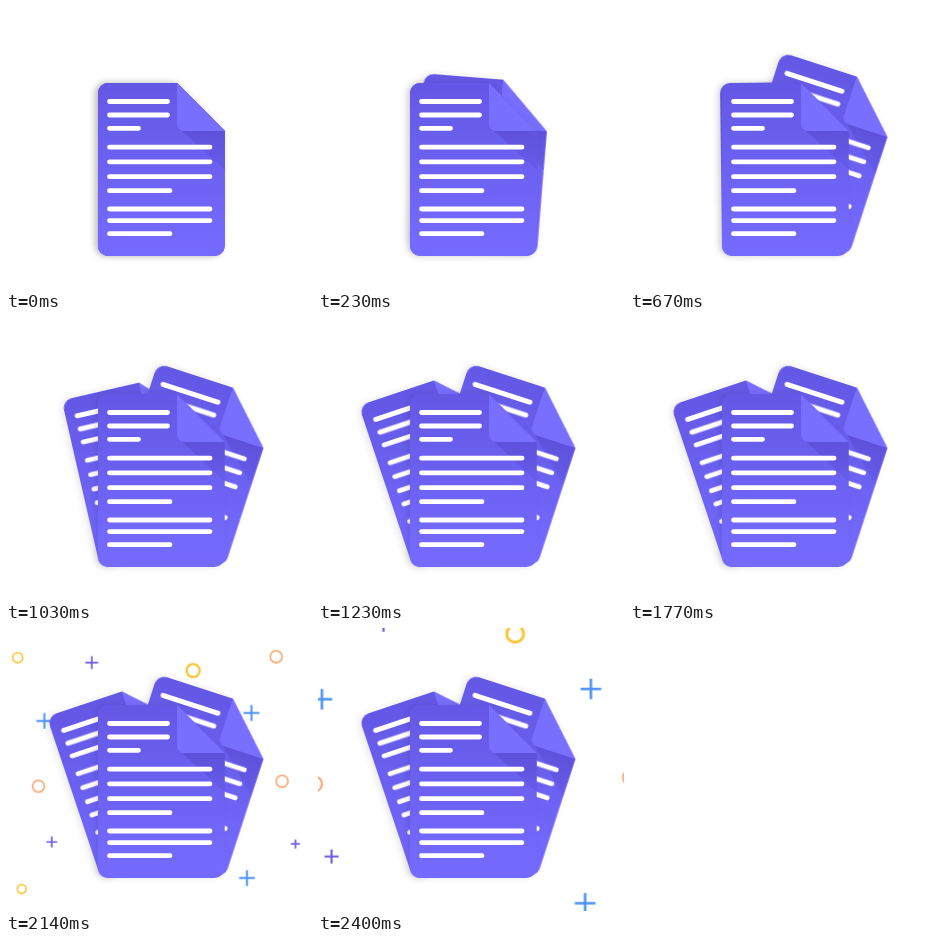
An HTML page without scripts for the animation above (2430 ms loop, 306x283 px).

```html
<!DOCTYPE html>
<html lang="en">
<head>
<meta charset="utf-8">
<title>Documents fanning out</title>
<style>
  html, body { margin: 0; width: 100%; height: 100%; overflow: hidden; background: #fff; }
  svg { display: block; width: 100%; height: 100%; }

  .right, .left, .confetti { animation: 2430ms linear infinite; }
  .right { transform-origin: 219px 250px; animation-name: fan-right; }
  .left { transform-origin: 102px 240px; animation-name: fan-left; }
  .confetti { transform-origin: 153.6px 165.5px; animation-name: burst; }

  @keyframes fan-right {
    0% { transform: rotate(0deg); animation-timing-function: cubic-bezier(.5, 0, .7, 1); }
    23.05%, 100% { transform: rotate(18deg); }
  }
  @keyframes fan-left {
    0%, 23.05% { transform: rotate(0deg); animation-timing-function: cubic-bezier(.5, 0, .7, 1); }
    51.03%, 100% { transform: rotate(-18.5deg); }
  }
  @keyframes burst {
    0%, 71.6% { transform: scale(0); animation-timing-function: ease-out; }
    100% { transform: scale(1.288); }
  }

  .lines { fill: none; stroke: #fff; stroke-width: 4.8; stroke-linecap: round; }
  .confetti { fill: none; stroke-width: 2; }
  .yellow { stroke: #fcc32f; }
  .orange { stroke: #faa469; stroke-width: 1.6; }
  .blue { stroke: #4d93f6; }
  .purple { stroke: #6f5be2; stroke-width: 1.7; }
</style>
</head>
<body>
<svg viewBox="0 0 306 283">
  <defs>
    <linearGradient id="paper" x1="0" y1="0" x2="0" y2="1">
      <stop offset="0" stop-color="#6458e5"/>
      <stop offset="1" stop-color="#756bff"/>
    </linearGradient>
    <linearGradient id="shade" gradientUnits="userSpaceOnUse" x1="195" y1="125" x2="195" y2="163">
      <stop offset="0" stop-color="#5548cf" stop-opacity=".55"/>
      <stop offset="1" stop-color="#5548cf" stop-opacity=".25"/>
    </linearGradient>
    <filter id="shadow" x="-15%" y="-15%" width="130%" height="130%">
      <feDropShadow dx="-2.5" dy="0" stdDeviation="3" flood-color="#000" flood-opacity=".1"/>
    </filter>
    <g id="page">
      <path filter="url(#shadow)" fill="url(#paper)"
        d="M102 77H171L218.7 125V240a10 10 0 0 1-10 10H102a10 10 0 0 1-10-10V87a10 10 0 0 1 10-10Z"/>
      <path fill="url(#shade)" d="M173 122 218.7 164V125H178Z"/>
      <path fill="#786eff" d="M171 77V118a7 7 0 0 0 7 7H218.7Z"/>
      <path class="lines" d="M103.5 95.5H161.500M103.5 109H161.500M103.5 122.300H132.500
        M103.5 141.200H204M103.5 155.800H204M103.5 170.700H204M103.5 184.700H164
        M103.5 203H204M103.5 214.600H204M103.5 227.700H164"/>
    </g>
    <path id="plus" d="M-8 0H8M0-8V8"/>
    <path id="small-plus" d="M-5.500 0H5.500M0-5.500V5.500"/>
  </defs>

  <g class="confetti">
    <g class="yellow">
      <circle cx="10" cy="28" r="5" stroke-width="1.700"/>
      <circle cx="187.500" cy="41" r="6.600" stroke-width="2.200"/>
      <circle cx="14" cy="262" r="4.500" stroke-width="1.700"/>
    </g>
    <g class="orange">
      <circle cx="271.500" cy="27" r="6"/>
      <circle cx="31" cy="158" r="6"/>
      <circle cx="277.500" cy="153" r="6"/>
    </g>
    <g class="blue">
      <use href="#plus" x="37" y="92"/>
      <use href="#plus" x="246.500" y="84"/>
      <use href="#plus" x="242" y="251"/>
    </g>
    <g class="purple">
      <path d="M78.500 33H91.500M85 26.500V39.500"/>
      <use href="#small-plus" x="44.500" y="214.500"/>
      <path d="M286.500 216.500H295.500M291 212V221"/>
    </g>
  </g>
  <use class="left" href="#page"/>
  <use class="right" href="#page"/>
  <use href="#page"/>
</svg>
</body>
</html>
```
